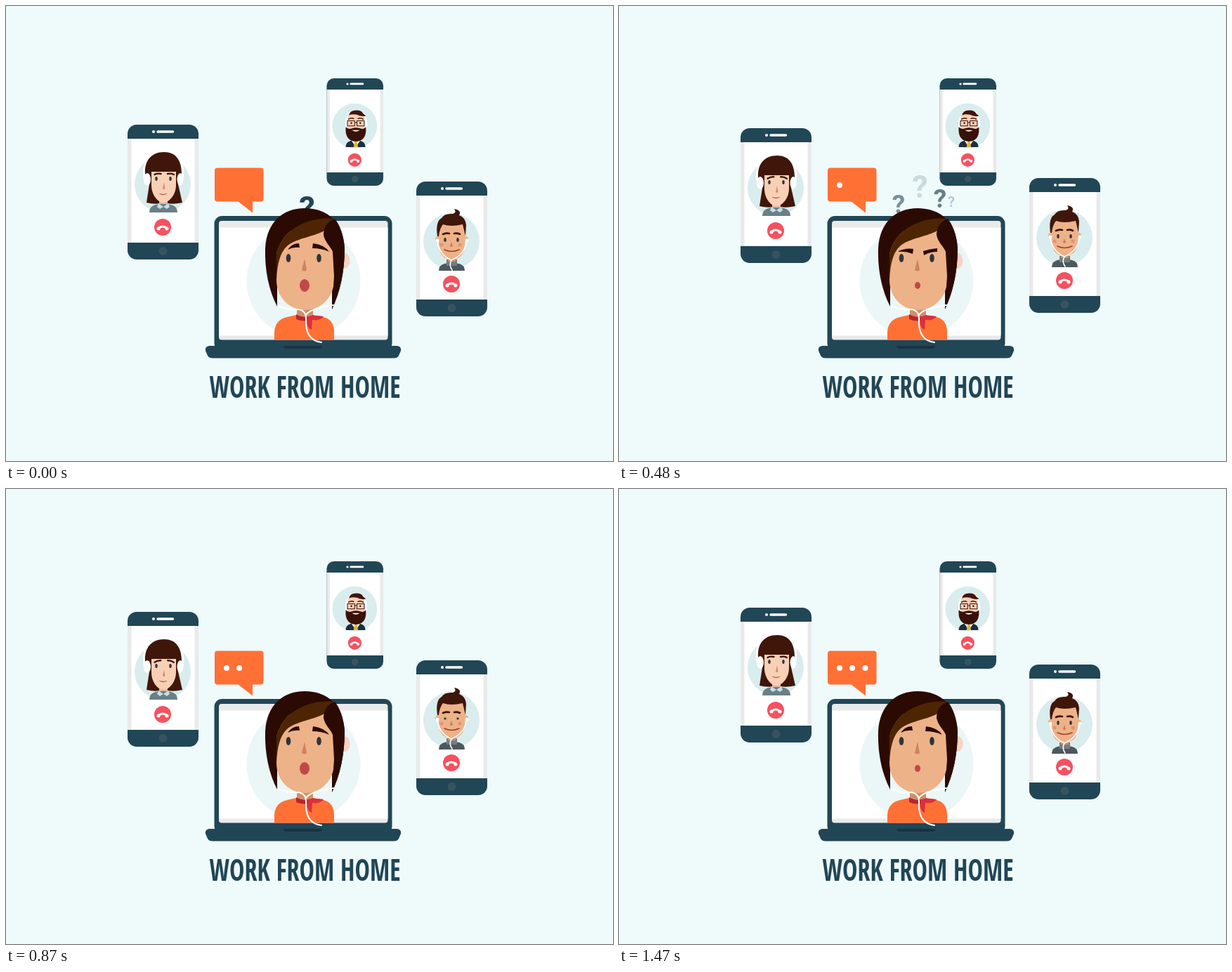
An HTML page for the animation above (1500 ms loop, 864 by 648 pixels).

```html
<!DOCTYPE html>
<html lang="en">
<head>
<meta charset="utf-8">
<title>Work from home</title>
<style>
  html, body { margin: 0; width: 100%; height: 100%; overflow: hidden; background: #effafb }
  svg { display: block; width: 100vw; height: 100vh }
  .dark { fill: #214656 }
  .skin { fill: #edb288 }
  .pale { fill: #f8d0b6 }
  .hair { fill: #2b0a04 }
  .line { fill: none; stroke-linecap: round; stroke-linejoin: round }
  .wire { fill: none; stroke: #fff; stroke-linecap: round }
  .mark { font: 700 45px Roboto, sans-serif; text-anchor: middle }
  #title { font: 700 45px 'Open Sans Condensed', 'Roboto Condensed', 'Open Sans', 'Noto Sans', sans-serif;
    font-stretch: extra-condensed; text-anchor: middle }
</style>
</head>
<body>
<svg viewBox="0 0 864 648">
  <defs>
    <g id="phone">
      <rect class="dark" width="101" height="192" rx="13"/>
      <path fill="#e9eaea" d="M0 20h101v148H0z"/>
      <path fill="#fff" d="M5.500 20h90v148h-90z"/>
      <circle cx="37" cy="10" r="2" fill="#fff"/>
      <path class="wire" stroke-width="3.400" d="M43 10h21.500"/>
      <circle cx="50.500" cy="180" r="6" fill="#38535f"/>
      <circle cx="50" cy="85" r="40" fill="#d9ecee"/>
      <circle cx="50" cy="146" r="12" fill="#f5515f"/>
      <path class="wire" stroke-width="3" d="M43.500 148Q50 142 56.500 148"/>
      <g fill="#fff"><circle cx="44" cy="148" r="2.500"/><circle cx="56" cy="148" r="2.500"/></g>
    </g>
  </defs>

  <!-- bearded caller -->
  <g transform="translate(456.500 103) scale(.797)">
    <use href="#phone"/>
    <path fill="#1a3040" d="M34 123q0-9 8-11l10-3 9 3q8 2 8 11z"/>
    <path fill="#fff" d="M44 111h16l-8 12z"/>
    <path fill="#e3b932" d="M50 113h4l2 10h-8z"/>
    <path class="wire" stroke-width="2.500" d="M35 92Q32 68 44 60M70 92Q73 68 62 60"/>
    <path class="pale" d="M38 66Q52 58 67 66V100H38z"/>
    <path fill="#40140b" d="M40 66Q41 57 53 57Q63 57 65 63L70 67Q61 69 54 65Q46 63 40 66z"/>
    <path fill="#3a1108" d="M34 87Q38 91 43 90Q52 86 62 90Q67 91 70 87Q72 112 52 113Q32 112 34 87z"/>
    <path fill="#fff" d="M45 92.500h14q-7 5-14 0z"/>
    <g class="line" stroke="#40140b">
      <path stroke-width="2" d="M39 73q5-3 9-1M56 72q5-2 9 1"/>
      <path stroke-width="1.300" d="M37 76h13v9h-13zM54 76h13v9h-13zM50 79h4"/>
    </g>
    <g class="hair"><circle cx="44" cy="80" r="1.500"/><circle cx="60" cy="80" r="1.500"/></g>
  </g>

  <!-- caller with headphones -->
  <g id="left">
    <use href="#phone"/>
    <path class="wire" stroke-width="3" d="M24 76Q20 52 38 46M78 76Q82 52 64 46"/>
    <path fill="#40160a" d="M52 39C34 39 24 51 25 70L31 85L27 111Q38 114 48 112H56Q66 114 78 111L72 85L77 70C77 51 69 39 52 39z"/>
    <path fill="#e9b697" d="M45 104h12v13H45z"/>
    <path fill="#6b7f86" d="M31 125q0-9 9-11l6-1h10l6 1q9 2 9 11z"/>
    <path fill="#c3dfe7" d="M44 112l7 5 7-5 2 5-4 3-5-3-5 3-4-3z"/>
    <path class="pale" d="M34 65H69V86C69 100 59 111 51 111C43 111 34 100 34 86z"/>
    <path fill="#40160a" d="M32 58H71V67H32z"/>
    <g fill="#fff"><ellipse cx="28" cy="78" rx="5" ry="9"/><ellipse cx="75" cy="78" rx="4.500" ry="9"/></g>
    <g class="line" stroke="#40160a" stroke-width="2.400"><path class="brow" d="M38.500 71q4-2 9-1"/><path class="brow" d="M57 70q5-1 9 1"/></g>
    <g fill="#2f3337"><ellipse cx="41" cy="77" rx="1.700" ry="3"/><ellipse cx="61" cy="77" rx="1.700" ry="3"/></g>
    <path fill="#d98a70" d="M52 82l1.500 9q-1.500 2-3.500 0z"/>
    <path class="line" stroke="#b65447" stroke-width="1.300" d="M46 98.500q5 2 9 0"/>
  </g>

  <!-- smiling caller -->
  <g id="right">
    <use href="#phone"/>
    <path fill="#4d585c" d="M32 127q0-8 8-10l10-2 11 2q8 2 8 10z"/>
    <path fill="#717f84" d="M43 111h15v9H43z"/>
    <path fill="#cf8f6b" d="M45 105h11v9H45z"/>
    <g class="skin"><circle cx="31" cy="82" r="4"/><circle cx="70" cy="82" r="4"/></g>
    <path class="skin" d="M32 54H69V90Q68 111 50 111Q33 111 32 90z"/>
    <path fill="#40160a" d="M30 78Q27 57 36 52Q40 45 52 46Q58 44 54 39Q65 41 61 48Q70 51 71 62L70 78Q68 69 66 61Q49 65 38 61Q33 67 32 78z"/>
    <path class="wire" stroke-width="1.600" d="M30 84Q32 104 50 112Q69 104 72 84M50 112q-4 7 1 14"/>
    <g fill="#fff"><circle cx="30" cy="84" r="2.500"/><circle cx="72" cy="84" r="2.500"/></g>
    <path class="line" stroke="#40160a" stroke-width="2.600" d="M38 75q5-2 9-1M54 74q4-1 8 1"/>
    <g fill="#2f3337"><ellipse class="eye" cx="41" cy="83" rx="1.700" ry="3"/><ellipse class="eye" cx="59" cy="83" rx="1.700" ry="3"/></g>
    <g fill="#e18468" opacity=".7"><circle cx="36" cy="90" r="2.500"/><circle cx="62" cy="90" r="2.500"/></g>
    <path fill="#c77d5c" d="M50 86l2 6q-2 2-4 0z"/>
    <path class="line" stroke="#a63d31" stroke-width="1.600" d="M40 97q10 5 21 0"/>
  </g>

  <!-- speech bubble -->
  <rect x="297" y="230.500" width="69.500" height="48" rx="4" fill="#ff7035"/>
  <path fill="#ff7035" d="M330 278h21v16.500z"/>
  <g fill="#fff">
    <circle class="dot" cx="314" cy="255" r="4"/><circle class="dot" cx="332" cy="255" r="4"/><circle class="dot" cx="350.500" cy="255" r="4"/>
  </g>

  <!-- laptop -->
  <rect class="dark" x="296.500" y="299" width="253" height="192" rx="11"/>
  <rect x="303" y="306" width="240.500" height="169.500" rx="4" fill="#e9eaea"/>
  <path fill="#fff" d="M303 315.500h240.500v154H303z"/>
  <path fill="#ebf6f7" d="M402 469.500A81 81 0 1 1 445 469.500z"/>
  <path class="dark" d="M289 484H557Q563 485 562 491L559 498Q557 501.500 552 501.500H294Q289 501.500 287 498L284 491Q283 485 289 484z"/>
  <path fill="#17343f" d="M395 484h55q0 4-5 4h-45q-5 0-5-4z"/>
  <g id="marks" class="dark mark"></g>

  <!-- woman on the laptop -->
  <path fill="#ff7035" d="M382 475.500V464Q383 447 400 443L413 440H438L452 443Q467 447 467 464V475.500z"/>
  <path fill="#cf8f6b" d="M414 426h23v17q-12 5-23 0z"/>
  <path fill="#b9252f" d="M413 439q12 7 25 1v6q-13 5-25 0z"/>
  <path fill="#dc2f3c" d="M429 442q12-2 23 0q-5 7-16 5l-1 14q-8-3-6-19z"/>
  <ellipse cx="482" cy="363" rx="7.500" ry="11" fill="#f6d2c0"/>
  <path class="hair" d="M425 288C458 288 480 308 482 345C482 380 475 408 464 432V360H386V428C374 405 368 375 369 345C371 308 394 288 425 288z"/>
  <path class="skin" d="M385 320H467V390C467 416 447 433 426 433C404 433 385 416 385 390z"/>
  <path fill="#4d2503" d="M385 390C377 352 393 318 430 307C446 302 460 302 468 303C458 307 454 313 453 320C440 328 412 331 400 342C390 351 386 368 385 390z"/>
  <path class="hair" d="M385 318V390C377 352 393 318 430 307zM468 303C456 308 452 317 452 326C454 337 462 342 465 350L467 385L464 432C475 408 482 380 482 345Q480 318 468 303z"/>
  <path class="wire" stroke-width="2" d="M387 427Q400 433 417 432Q427 434 427 445Q425 476 449 479M427 440Q432 431 466 426"/>
  <g id="worried" class="hair">
    <path d="M401 347Q407 338 417 338L418 344Q409 343 401 347z"/><path d="M437 338Q453 340 460 350Q449 345 436 345z"/>
  </g>
  <g id="stern" class="hair">
    <path d="M398 349Q409 344 419 346L418 353Q408 349 398 350z"/><path d="M453 345Q442 346 433 349L434 355Q443 350 453 350z"/>
  </g>
  <g fill="#2f3337"><ellipse cx="402" cy="359" rx="3.300" ry="6"/><ellipse cx="445.500" cy="359" rx="3.300" ry="6"/></g>
  <path fill="#cb845f" d="M425 360L428 376Q425 379 421 376z"/>
  <ellipse id="mouth" cx="425" fill="#c1484a"/>

  <text id="title" class="dark" transform="translate(425.500 557.500) scale(1 1.200)">WORK FROM HOME</text>
</svg>
<script>
const $ = id => document.getElementById(id);
const all = selector => [...document.querySelectorAll(selector)];
const set = (el, attrs) => { for (const k in attrs) el.setAttribute(k, attrs[k]); };
const show = (el, on) => set(el, { visibility: on ? 'visible' : 'hidden' });

const LOOP = 1500, STEP = 30, PEAK = 720, END = 1470;
const dots = all('.dot'), brows = all('#left .brow'), eyes = all('.eye');

// x, baseline at time 0, font size, first and last moment
const marks = [[428.5, 303, 45, 0, 560], [398, 324.5, 37, 0, 745], [457, 317, 37, 60, 790], [473, 315.5, 20, 100, 600]]
  .map(([x, y, size, from, to]) => {
    const el = document.createElementNS('http://www.w3.org/2000/svg', 'text');
    el.textContent = '?';
    el.style.fontSize = size + 'px';
    set(el, { x });
    $('marks').append(el);
    return { el, y, from, to };
  });

// mouth shapes: start time, rx, ry, cy
const mouths = [[0, 7, 9, 398], [150, 4, 5, 398], [750, 7, 9, 398], [960, 10, 6, 400], [1150, 7, 9, 398], [1370, 4, 5, 398]];

// keep the title inside the laptop's width
const titleWidth = $('title').getComputedTextLength();
$('title').style.fontSize = 45 * Math.min(1, 272 / titleWidth) + 'px';

function draw(now) {
  const t = Math.floor(now % LOOP / STEP) * STEP;
  const drift = 7.5 * (t < PEAK ? t / PEAK : (END - t) / (END - PEAK));
  set($('left'), { transform: `translate(173 ${169 + drift})` });
  set($('right'), { transform: `translate(584 ${250 - drift})` });

  dots.forEach((dot, i) => show(dot, t >= 375 * (i + 1)));
  marks.forEach(({ el, y, from, to }) => {
    show(el, t >= from && t < to);
    set(el, { y: y - t * .062, opacity: Math.max(0, Math.min(1, (to - t) / 460)) });
  });

  const [, rx, ry, cy] = mouths.findLast(([start]) => t >= start);
  set($('mouth'), { rx, ry, cy });
  const stern = t >= 150 && t < 750;
  show($('stern'), stern);
  show($('worried'), !stern);

  const tilt = t >= 200 && t < 1150 ? 10 : 0;
  set(brows[0], { transform: `rotate(${-tilt} 43 71)` });
  set(brows[1], { transform: `rotate(${tilt} 61 71)` });
  eyes.forEach(eye => set(eye, { ry: t >= 840 && t < 900 ? 1.4 : 3 }));
  requestAnimationFrame(draw);
}
draw(performance.now());
</script>
</body>
</html>
```
